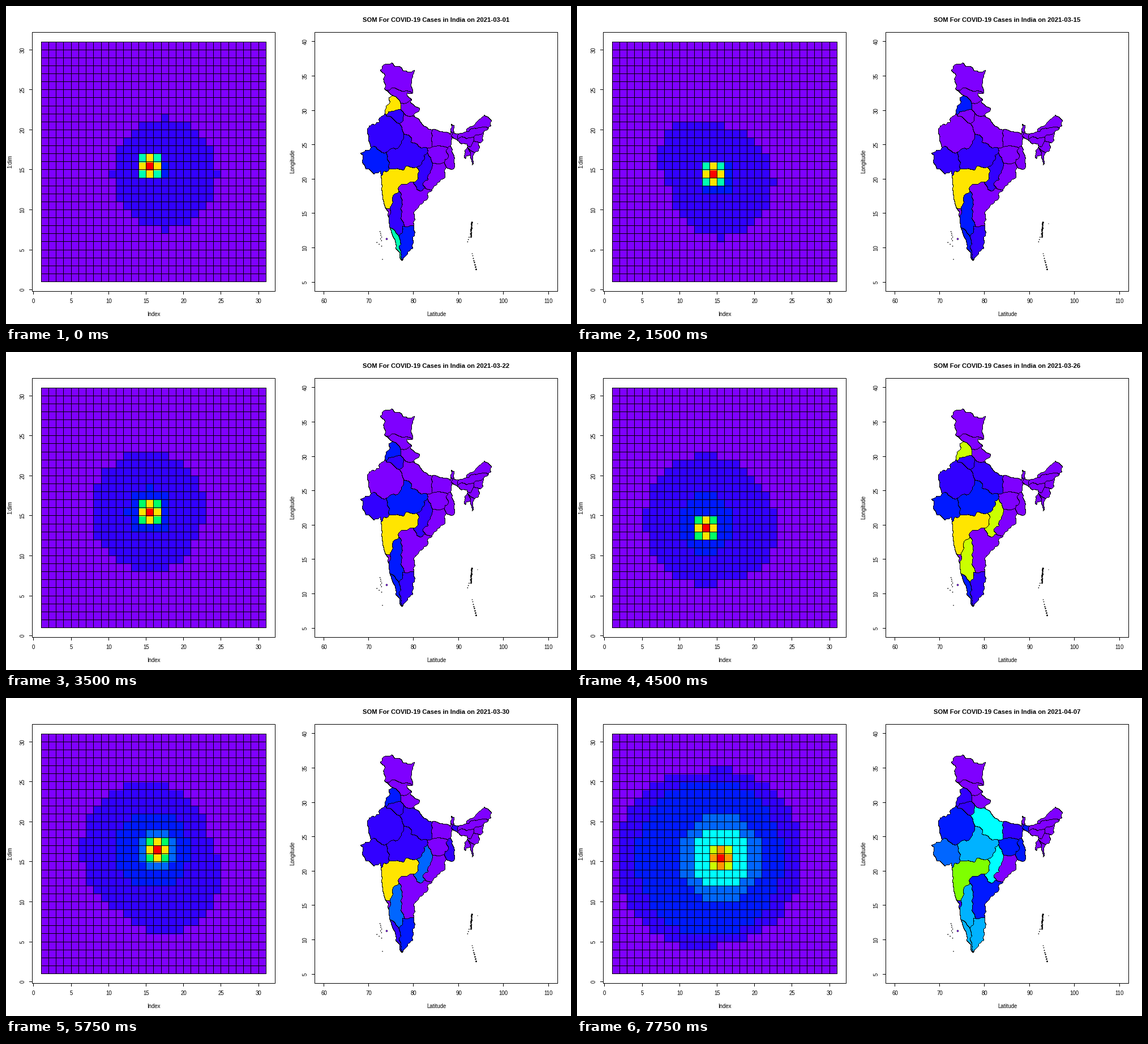
These frames come from a looping animation (998x561 px, 8000 ms). A matplotlib script:

```python
import colorsys
import math
import random

import numpy as np
import matplotlib.pyplot as plt
from matplotlib.animation import FuncAnimation
from matplotlib.patches import Circle, Rectangle
from matplotlib.path import Path

W, H, DPI = 998, 561, 64
PX = 72 / DPI  # points per pixel
PALETTE = np.array([colorsys.hsv_to_rgb((15 - k) / 20, 1, 1) for k in range(16)])

plt.rcParams["font.family"] = "Liberation Sans"
fig = plt.figure(figsize=(W / DPI, H / DPI), dpi=DPI, facecolor="white")
ax = fig.add_axes([0, 0, 1, 1])
ax.axis("off")

# Frames follow the text order of the day numbers: 1, 10, ..., 19, 2, 20, ...
DAYS = sorted([*range(1, 4), *range(10, 39)], key=str)

# ---- heat field: two overlapping discs, inner rings and a hot peak -----
# day: peak x, y; disc x, y, radius; second disc; radii of rings 2, 3 and 5
KEYS = {
    1: (15, 15, 17, 14, 7, 17, 14, 7, 1.2, 0, 0),
    15: (14, 14, 15, 13, 7, 11.5, 16, 4.9, 2.3, 0, 0),
    19: (16, 16, 16, 16, 7, 15, 17.5, 7, 2.3, 0, 0),
    26: (13, 13, 13, 14, 8.2, 15.5, 13, 6.9, 3.9, 0, 0),
    30: (16, 16, 14.5, 16, 8.7, 17, 13, 7.3, 4.9, 2.4, 0),
    34: (16, 16, 14.3, 15.8, 9.3, 15.3, 12.2, 9.4, 5.4, 3.6, 0),
    38: (15, 15, 12, 14.8, 11, 15, 15.2, 10.9, 9.8, 5.4, 3.9),
}
KEY_DAYS = list(KEYS)
cols, rows = np.meshgrid(np.arange(1, 31), np.arange(1, 31))


def field_at(day):
    px, py, x1, y1, r1, x2, y2, r2, *rings = (
        np.interp(day, KEY_DAYS, values) for values in zip(*KEYS.values()))
    px, py = round(px), round(py)
    discs = [(1, x1, y1, r1), (1, x2, y2, r2),
             (2, (px + x1) / 2, (py + y1) / 2, rings[0]),
             (3, px, py, rings[1]), (5, px, py, rings[2])]
    level = np.zeros(cols.shape)
    for value, x, y, r in discs:
        level[np.hypot(cols - x, rows - y) <= r] = value
    d = np.hypot(cols - px, rows - py) / (1 + 0.08 * rings[2])
    peak = np.interp(d, [0, 1, 1.42], [15, 12, 6 + day / 40])
    return np.round(np.where(d < 1.45, peak, level)).astype(int)


# ---- plot frames -------------------------------------------------------
def col_x(c):
    return math.floor(48.95 + 13.24 * c) + 0.5


def row_y(r):
    return math.floor(500.68 - 14.114 * r) + 0.5


def line(x, y):
    ax.plot(x, y, color="black", lw=PX, solid_capstyle="projecting", snap=False, zorder=3)


def label(x, y, text, size=9.6, **kw):
    kw = {"ha": "center", "va": "baseline", **kw}
    return ax.text(x, y, text, fontsize=size * PX, **kw)


def panel(left, right, xs, ys, xlabel, ylabel):
    ax.add_patch(Rectangle((left, 46.5), right - left, 457, fill=False, lw=PX,
                           snap=False, zorder=3))
    for value, x in xs:
        line([x, x], [503.5, 508.5])
        label(x, 524, str(value))
    for value, y in ys:
        line([left - 5, left], [y, y])
        label(left - 17, y, str(value), rotation=90, va="center")
    label((left + right) / 2, 547, xlabel)
    label(left - 39.5, 274, ylabel, rotation=90, va="center")


fives = range(0, 31, 5)
panel(46.5, 475.5, [(v, col_x(v)) for v in fives], [(v, row_y(v)) for v in fives],
      "Index", "1:dim")
panel(545.5, 974.5, [(v, math.floor(561 + 7.945 * (v - 60)) + 0.5) for v in range(60, 111, 10)],
      [(v, math.floor(487 - 12.12 * (v - 5)) + 0.5) for v in range(5, 41, 5)],
      "Latitude", "Longitude")
title = label(759.5, 28, "", size=11.25, weight="bold")

heat = ax.imshow(np.zeros((30, 30, 3)), origin="lower", interpolation="nearest",
                 aspect="auto", extent=(col_x(1), col_x(31), row_y(1), row_y(31)))
for k in range(1, 32):
    line([col_x(k)] * 2, [row_y(1), row_y(31)])
    line([col_x(1), col_x(31)], [row_y(k)] * 2)

# ---- map: a coast line, split between the nearest states ---------------
LEFT, RIGHT, TOP, BOTTOM = 620, 866, 90, 456
COAST = [
    (661, 109), (671, 102), (680, 98), (701, 113), (721, 114), (714, 132), (717, 152),
    (709, 157), (714, 170), (728, 180), (722, 196), (738, 211), (752, 216), (784, 226),
    (785, 208), (791, 209), (790, 222), (798, 226), (814, 220), (826, 207), (846, 191),
    (852, 196), (858, 209), (843, 222), (837, 243), (833, 257), (826, 260), (823, 281),
    (818, 262), (812, 269), (809, 260), (817, 251), (813, 244), (799, 240), (797, 232),
    (788, 233), (785, 245), (790, 262), (792, 286), (778, 286), (774, 300), (755, 320),
    (737, 346), (722, 358), (722, 395), (718, 428), (709, 436), (699, 450), (692, 434),
    (680, 393), (668, 350), (662, 305), (660, 290), (650, 296), (637, 287), (632, 277),
    (627, 260), (645, 248), (637, 232), (638, 212), (655, 207), (668, 188), (676, 170),
    (677, 160), (683, 156), (671, 147), (669, 124)]

px, py = np.meshgrid(np.arange(LEFT, RIGHT) + 0.5, np.arange(TOP, BOTTOM) + 0.5)


def ripple(seed):
    """Sum of short waves that makes the borders jagged."""
    rng = random.Random(seed)
    total = np.zeros(px.shape)
    for _ in range(12):
        length, angle = rng.uniform(6, 22), rng.uniform(0, math.tau)
        along = px * math.cos(angle) + py * math.sin(angle)
        total += 0.035 * length * np.sin(math.tau * (along / length + rng.random()))
    return total


wx, wy = px + ripple(1), py + ripple(2)
levels, depths = [], []


def state(key_levels, *capsules):
    """A state is a union of capsules: x0, y0, x1, y1, radius."""
    depth = np.full(px.shape, np.inf)
    for x0, y0, x1, y1, r in capsules:
        dx, dy = x1 - x0, y1 - y0
        t = ((wx - x0) * dx + (wy - y0) * dy) / max(dx * dx + dy * dy, 1)
        t = np.clip(t, 0, 1)
        depth = np.minimum(depth, np.hypot(wx - x0 - t * dx, wy - y0 - t * dy) - r)
    levels.append(key_levels)
    depths.append(depth)


CALM = (0,) * 7
state(CALM, (682, 120, 708, 128, 20))  # Jammu, Kashmir and Ladakh
state(CALM, (690, 157, 704, 163, 9))  # Himachal Pradesh
state((12, 2, 2, 11, 2, 1, 1), (684, 165, 684, 177, 10))  # Punjab
state((1, 0, 1, 1, 1, 1, 1), (687, 190, 693, 200, 8))  # Haryana
state(CALM, (708, 176, 720, 186, 9))  # Uttarakhand
state((1, 0, 0, 1, 1, 1, 2), (660, 222, 680, 225, 25))  # Rajasthan
state((0, 0, 0, 1, 1, 3, 5), (712, 212, 738, 233, 17))  # Uttar Pradesh
state((1, 1, 2, 2, 1, 2, 4), (696, 268, 725, 262, 20), (706, 232, 703, 242, 8))  # Madhya Pradesh
state((2, 1, 1, 2, 1, 1, 3), (645, 270, 658, 278, 16))  # Gujarat
state((12,) * 6 + (10,), (680, 305, 714, 296, 13), (674, 315, 674, 342, 12))  # Maharashtra
state((0, 0, 0, 0, 0, 0, 1), (673, 361, 673, 361, 5))  # Goa
state((1, 2, 2, 11, 3, 3, 4), (689, 342, 693, 392, 10))  # Karnataka
state((0, 0, 0, 0, 0, 1, 2), (711, 322, 709, 375, 12), (715, 340, 742, 328, 10))  # Andhra Pradesh
state((2, 1, 1, 1, 2, 2, 4), (710, 398, 704, 435, 10))  # Tamil Nadu
state((6, 2, 2, 2, 1, 2, 4), (684, 398, 696, 442, 4))  # Kerala
state((1, 1, 1, 11, 3, 11, 5), (741, 268, 732, 318, 9))  # Chhattisgarh
state(CALM, (765, 290, 747, 315, 11))  # Odisha
state((0, 0, 0, 0, 0, 1, 2), (757, 262, 770, 260, 13))  # Jharkhand
state((0, 0, 0, 0, 0, 0, 1), (761, 235, 778, 233, 13))  # Bihar
state((0, 0, 0, 0, 1, 2, 2), (785, 255, 787, 280, 8), (788, 228, 795, 227, 4))  # West Bengal
state(CALM, (788, 210, 788, 216, 5))  # Sikkim
state(CALM, (803, 228, 840, 217, 5))  # Assam
state(CALM, (820, 215, 850, 203, 7))  # Arunachal Pradesh
state(CALM, (803, 238, 817, 238, 4))  # Meghalaya
state(CALM, (834, 235, 839, 228, 4))  # Nagaland
state(CALM, (829, 249, 831, 249, 7))  # Manipur
state(CALM, (821, 262, 822, 275, 5))  # Mizoram
state(CALM, (812, 261, 813, 264, 5))  # Tripura

inside = Path(COAST).contains_points(np.column_stack([wx.ravel(), wy.ravel()]))
region = np.where(inside.reshape(px.shape), np.argmin(depths, axis=0), len(levels))
border = (region != np.roll(region, 1, 0)) | (region != np.roll(region, 1, 1))
levels = np.array(levels)


def map_at(day):
    key = int(np.argmin([abs(day - k) for k in KEY_DAYS]))
    colors = np.vstack([PALETTE[levels[:, key]], [1, 1, 1]])
    return np.where(border[..., None], 0, colors[region])


land = ax.imshow(np.ones(px.shape + (3,)), interpolation="nearest", aspect="auto",
                 extent=(LEFT, RIGHT, BOTTOM, TOP))


# ---- islands -----------------------------------------------------------
def dot(x, y, r=0.9, color="black"):
    ax.add_patch(Circle((x, y), r, fc=color, ec="black", lw=0.5 * PX, zorder=4))


rng = random.Random(5)
for k in range(9):
    dot(659 + rng.uniform(-4, 5), 398 + 3.2 * k, 0.6)
dot(672.5, 411, 1.5, PALETTE[0])
dot(665, 447, 0.5)
dot(833, 384, 0.3)
for k in range(14):
    dot(823 - k / 7 + rng.uniform(-0.6, 0.6), 382 + 2 * k, rng.uniform(0.8, 1.4))
for k in range(3):
    dot(818 - 1.3 * k, 408 + 4 * k, 0.6)
for k in range(8):
    dot(823.5 + k, 436 + 4.2 * k + rng.uniform(-1, 1), 0.5 + 0.1 * k)

ax.set_xlim(0, W)
ax.set_ylim(H, 0)


def draw(i):
    day = DAYS[i]
    month, date = (3, day) if day <= 31 else (4, day - 31)
    title.set_text(f"SOM For COVID-19 Cases in India on 2021-{month:02d}-{date:02d}")
    heat.set_data(PALETTE[field_at(day)])
    land.set_data(map_at(day))
    return title, heat, land


anim = FuncAnimation(fig, draw, frames=len(DAYS), interval=250, repeat=True, repeat_delay=0)
plt.show()
```
